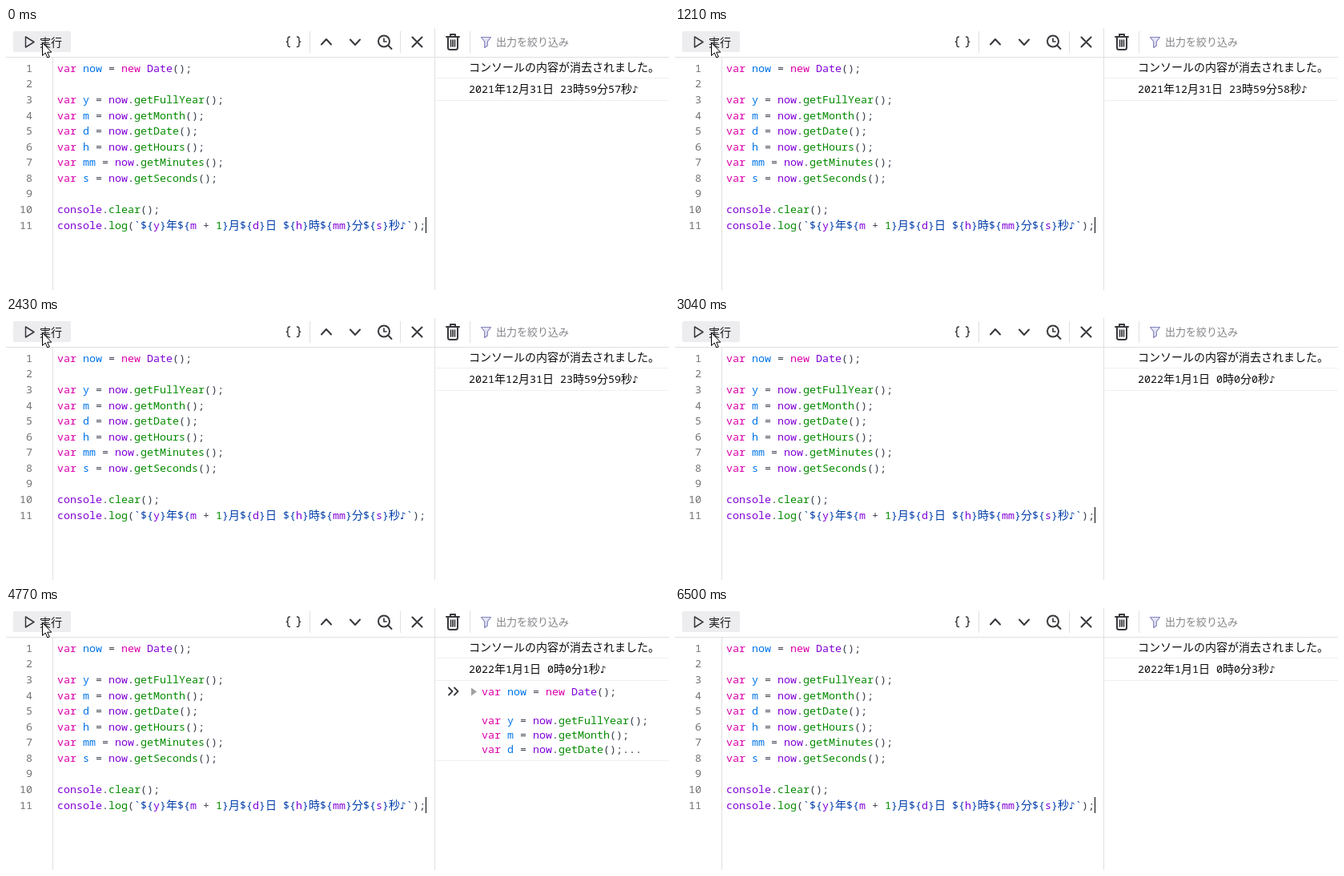
Recreate the animation shown at these times as an HTML page. Size 828 by 327 pixels, loop 6960 ms.

```html
<!DOCTYPE html>
<html lang="ja">
<head>
<meta charset="utf-8">
<title>Console clock</title>
<style>
html, body { margin: 0; width: 100%; height: 100%; overflow: hidden; background: #fff; }
svg { display: block; }
text { white-space: pre; }
.mono { font: 13.333px "Noto Sans Mono", monospace; }
.mono .jp { font-family: "Noto Sans CJK JP", "Noto Sans CJK", sans-serif; font-size: 14px; }
.mono .note { font-family: "DejaVu Sans", sans-serif; font-size: 12px; }
.ui { font-family: "Noto Sans CJK JP", "Noto Sans CJK", sans-serif; }
.line { stroke: #e0e0e2; fill: none; }
.row { stroke: #f0f0f2; fill: none; }
.icon { stroke: #38383d; stroke-width: 2; fill: none; stroke-linecap: round; stroke-linejoin: round; }
</style>
</head>
<body>
<svg width="828" height="327" viewBox="0 0 828 327">
  <rect width="828" height="327" fill="#fff"/>
  <path class="line" d="M0 36.5H828M58.5 37V327M535.5 0V327M379.5 4V31M492.5 4V31M579.5 4V31"/>

  <rect id="button" x="9" y="4" width="72" height="26" rx="2" fill="#ededf0"/>
  <path class="icon" style="stroke-width:1.5" d="M24.5 11L35 17.5L24.5 24Z"/>
  <text class="ui" x="42" y="22.5" font-size="14" fill="#18181a">実行</text>

  <path class="icon" style="stroke-width:1.4" d="M354.5 11q-2.5 0-2.5 2.2v2q0 2-1.7 2q1.7 0 1.7 2v2q0 2.3 2.5 2.3M363.5 11q2.5 0 2.5 2.2v2q0 2 1.7 2q-1.7 0-1.7 2v2q0 2.3-2.5 2.3"/>
  <path class="icon" d="M394 20.5L400 14L406 20.5M430 14.5L436 21L442 14.5M507.5 11.5L519.5 23.5M519.5 11.5L507.5 23.5"/>
  <circle class="icon" cx="472" cy="16.5" r="7"/>
  <path class="icon" d="M477.5 22L481.5 26"/>
  <path class="icon" style="stroke-width:1.7" d="M472 13V17H475"/>
  <path class="icon" d="M550 11H566M555 10.5V8H561V10.5M552 11.5V24.5Q552 27 554.5 27H561.5Q564 27 564 24.5V11.5"/>
  <path class="icon" style="stroke-width:1.7" d="M555.5 15V23M558 15V23M560.5 15V23"/>
  <path d="M593.5 11.5H605.5L601.3 17V22L597.7 24.5V17Z" fill="#e4e4f4" stroke="#8585bd" stroke-width="1.2" stroke-linejoin="round"/>
  <text class="ui" x="612" y="22" font-size="13" fill="#85858a">出力を絞り込み</text>

  <g id="editor" class="mono"></g>
  <rect id="caret" x="524" y="236" width="1" height="20" fill="#000"/>

  <text class="ui" x="578" y="54" font-size="14" fill="#0c0c0d">コンソールの内容が消去されました。</text>
  <path class="row" d="M536 62.5H828M536 90.5H828"/>
  <g id="output" class="mono"></g>
  <g id="echo" class="mono">
    <path class="icon" style="stroke-width:1.8" d="M553 99.5L557.5 104L553 108.5M560 99.5L564.5 104L560 108.5"/>
    <path d="M581 99.5L588 104.5L581 109.5Z" fill="#a0a0a4"/>
    <path class="row" d="M536 190.5H828"/>
  </g>

  <circle id="glow" cx="45" cy="18" r="11.5" fill="#fcee30" opacity="0.75"/>
  <path id="arrow" d="M45.5 18.5V34.5L49.2 31L51.8 37L54.3 36L51.7 30.2H56.8Z" fill="#fff" stroke="#000"/>
  <path id="beam" d="M-3 -8H3M0 -8V8M-3 8H3" fill="none" stroke="#000"/>
</svg>

<script>
const LOOP = 6960;
const INK = "#0c0c0d";
const code = [
  "var now = new Date();", "",
  "var y = now.getFullYear();", "var m = now.getMonth();", "var d = now.getDate();",
  "var h = now.getHours();", "var mm = now.getMinutes();", "var s = now.getSeconds();", "",
  "console.clear();",
  "console.log(`${y}年${m + 1}月${d}日 ${h}時${mm}分${s}秒♪`);"
];
// press time, time of the new result, seconds counted from 23:59:00
const clicks = [
  [70, 410, 58], [810, 1140, 58], [1540, 1960, 59], [2290, 2640, 60],
  [3110, 3440, 61], [3840, 4190, 61], [4570, 4900, 62], [5300, 5640, 63]
];
// time and place of the pointer as it leaves
const exit = [[5970, 72, 62], [6040, 112, 168], [6110, 150, 300]];

const $ = id => document.getElementById(id);
const show = (id, on) => $(id).style.display = on ? "" : "none";
const isWide = s => /[年月日時分秒]/.test(s);
const advance = s => isWide(s) ? 14 : 8 * s.length;
const fontClass = s => isWide(s) ? "jp" : s === "♪" ? "note" : "";

function add(parent, tag, attrs, content = "") {
  const el = document.createElementNS("http://www.w3.org/2000/svg", tag);
  for (const key in attrs) el.setAttribute(key, attrs[key]);
  el.textContent = content;
  parent.appendChild(el);
  return el;
}

// Draws [text, colour] pieces side by side.
function addLine(parent, x, y, pieces) {
  const line = add(parent, "text", { x, y });
  for (const [s, fill] of pieces) {
    if (s !== " ") add(line, "tspan", { x, fill, class: fontClass(s) }, s);
    x += advance(s);
  }
}

function highlight(src) {
  const rule = /\b(var|new)\b|((?<=var )\w+)|((?<=\.)\w+|\d+)|([A-Za-z]+)|(`|\$\{|\}|[年月日時分秒♪])|./g;
  const colors = ["#dd00a9", "#0074e8", "#058b00", "#8000d7", "#003eaa"];
  return [...src.matchAll(rule)].map(m => {
    const kind = m.slice(1).findIndex(Boolean);
    return [m[0], colors[kind] || "#393f4c"];
  });
}

code.forEach((src, i) => {
  const y = Math.floor(55.32 + 19.57 * i);
  add($("editor"), "text", { x: 33, y, "text-anchor": "end", fill: "#737373" }, i + 1);
  addLine($("editor"), 64, y, highlight(src));
});
code.slice(0, 5).forEach((src, i) =>
  addLine($("echo"), 594, 109 + 18 * i, highlight(src + (i === 4 ? "..." : ""))));

let shown;
function setOutput(sec) {
  if (sec === shown) return;
  shown = sec;
  const d = new Date(2021, 11, 31, 23, 59, sec);
  const str = `${d.getFullYear()}年${d.getMonth() + 1}月${d.getDate()}日 ` +
    `${d.getHours()}時${d.getMinutes()}分${d.getSeconds()}秒♪`;
  $("output").textContent = "";
  addLine($("output"), 578, 81, str.match(/\d+|./g).map(s => [s, INK]));
}

function render(t) {
  let sec = 57;
  let pressed = false, blurred = false, echo = false;
  for (const [down, done, value] of clicks) {
    const dt = t - down;
    if (t >= done) sec = value;
    if (dt >= 0 && dt < 140) pressed = true;
    if (dt >= 0 && dt < 200) blurred = true;
    if (dt >= 200 && t < done) echo = true;
  }
  setOutput(sec);
  show("echo", echo);
  show("glow", pressed);
  show("caret", !blurred && !(t >= 6040 && t < 6500));
  $("button").setAttribute("fill", t >= 1680 && t < 1810 ? "#eff6fd" : "#ededf0");

  const step = exit.filter(e => t >= e[0]).pop();
  show("arrow", !step);
  show("beam", step && t < 6170);
  if (step) $("beam").setAttribute("transform", `translate(${step[1] + 0.5} ${step[2] + 0.5})`);
}

const start = performance.now();
function tick() {
  render((performance.now() - start) % LOOP);
  requestAnimationFrame(tick);
}
render(0);
requestAnimationFrame(tick);
</script>
</body>
</html>
```
